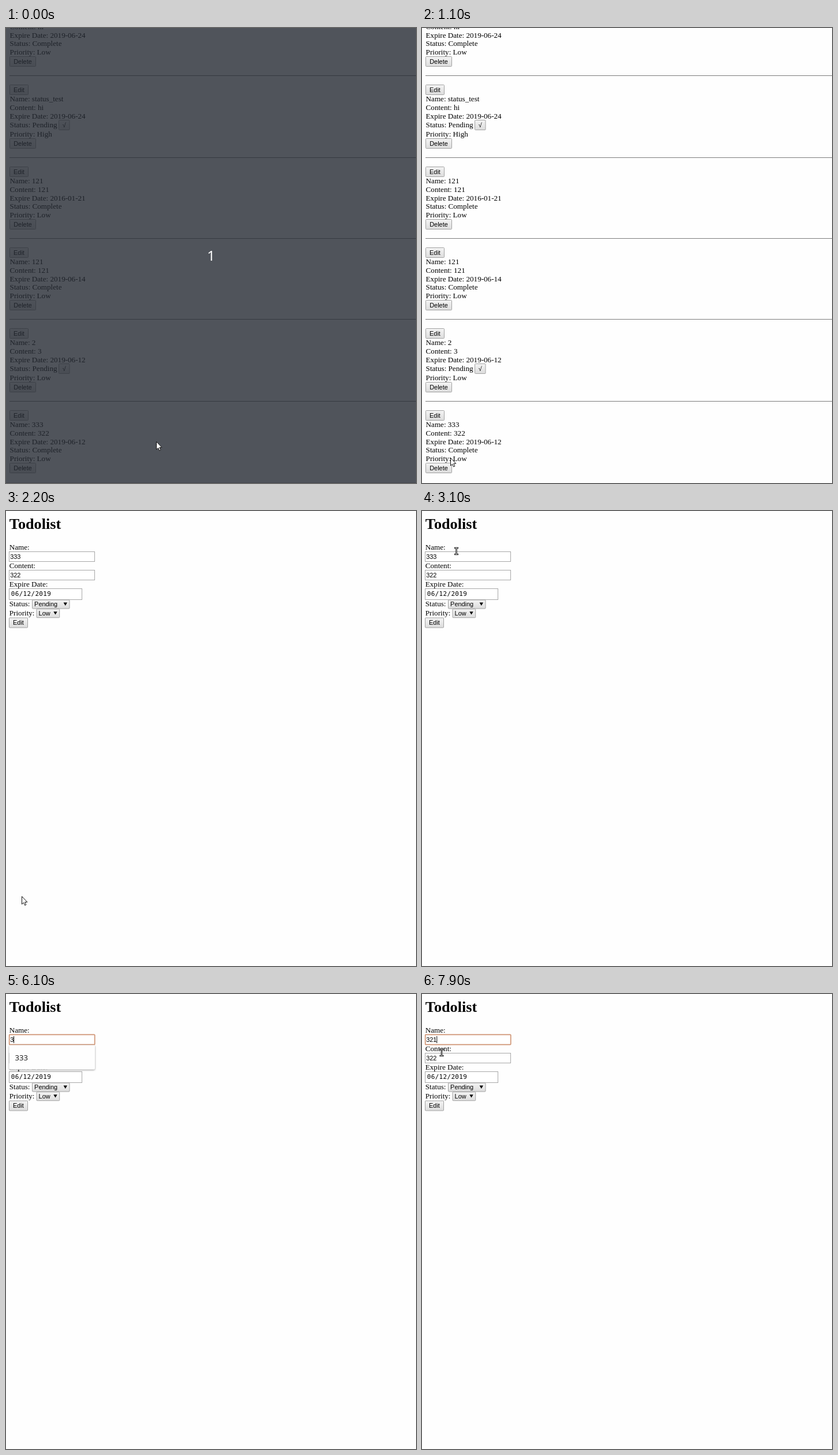
Animation, 710 px wide and 788 px high, one loop 8000 ms. Source, as an HTML page:

```html
<!DOCTYPE html>
<html lang="en">
<head>
<meta charset="utf-8">
<title>Todolist</title>
<style>
html, body { margin: 0; width: 100%; height: 100%; overflow: hidden; background: #fefefe; }
svg { display: block; width: 710px; height: 788px; }
text { font: 13.12px "Liberation Serif", serif; white-space: pre; }
.title { font-size: 26.24px; font-weight: bold; }
.ui { font: 10.93px "Liberation Sans", sans-serif; }
.mid { text-anchor: middle; }
.date { font: 10.93px "DejaVu Sans Mono", monospace; letter-spacing: .36px; }
.option { font: 500 13.1px "Noto Sans", sans-serif; fill: #222; }
.count { font: 24px "Noto Sans", sans-serif; fill: #fff; }
.btn { fill: url(#face); stroke: #a2a2a2; }
.hover .btn { fill: url(#lit); stroke: #6f6f6f; }
.box { fill: #fff; stroke: #a8a8a8; }
.rule { fill: #7c7c7c; }
#menu rect { fill: #fefefe; filter: drop-shadow(0 1px 1.5px rgba(0, 0, 0, .4)); }
</style>
</head>
<body>
<svg viewBox="0 0 710 788" xmlns="http://www.w3.org/2000/svg">
  <defs>
    <linearGradient id="face" x2="0" y2="1"><stop stop-color="#f4f4f4"/><stop offset="1" stop-color="#dcdcdc"/></linearGradient>
    <linearGradient id="lit" x2="0" y2="1"><stop stop-color="#f9f9f9"/><stop offset="1" stop-color="#e4e4e4"/></linearGradient>
  </defs>
  <rect width="710" height="788" fill="#fefefe"/>
  <g id="list"></g>
  <g id="form"></g>
  <g id="shade">
    <rect width="710" height="788" fill="rgb(37,42,50)" fill-opacity=".8"/>
    <rect y="787" width="710" height="1" fill="#45484e"/>
    <text class="count mid" x="355" y="403">1</text>
  </g>
  <path id="arrow" d="M.5 .5V14L3.6 11.2 5.6 15.9 7.8 15 5.8 10.3H9.8Z" fill="#fff" stroke="#111"/>
  <g id="beam" fill="none">
    <path d="M-3.5 -5.5H3.5M-3.5 5.5H3.5M0 -5.5V5.5" stroke="#111" stroke-width="2.6"/>
    <path d="M-2.6 -5.5H2.6M-2.6 5.5H2.6M0 -5.5V5.5" stroke="#eee" stroke-width=".8"/>
  </g>
</svg>
<script>
const $ = id => document.getElementById(id);
const text = (x, y, s, cls = '') => `<text class="${cls}" x="${x}" y="${y}">${s}</text>`;
const rect = (x, y, w, h, cls, r = 0) =>
  `<rect class="${cls}" x="${x}" y="${y}" width="${w}" height="${h}" rx="${r}"/>`;
const button = (x, cy, w, label, id = '') =>
  `<g id="${id}">${rect(x, cy - 8.5, w, 17, 'btn', 1)}${text(x + w / 2, cy + 3.9, label, 'ui mid')}</g>`;
const select = (x, y, w, label) => rect(x, y, w, 15, 'btn', 1) +
  text(x + 3.6, y + 11.4, label, 'ui') +
  `<path d="M${x + w - 10.4} ${y + 4.5}h6.4l-3.2 5.4z"/>`;

// top rule, name, content, date, priority, pending
const items = [
  [-58, 'test', 'hi', '2019-06-24', 'Low'],
  [82, 'status_test', 'hi', '2019-06-24', 'High', true],
  [224, '121', '121', '2016-01-21', 'Low'],
  [364, '121', '121', '2019-06-14', 'Low'],
  [504, '2', '3', '2019-06-12', 'Low', true],
  [646, '333', '322', '2019-06-12', 'Low']
];
$('list').innerHTML = items.map(([top, name, content, date, priority, pending], i) => {
  const last = i === items.length - 1;
  const grow = pending ? 1 : 0;
  const line = (n, s, dy = 0) => text(6.6, top + 45.2 + n * 14.72 + dy, s);
  return rect(6, top, 704, 1, 'rule') +
    button(6.5, top + 25, 32, 'Edit', last ? 'edit' : '') +
    line(0, 'Name: ' + name) +
    line(1, 'Content: ' + content) +
    line(2, 'Expire Date: ' + date) +
    line(3, 'Status: ' + (pending ? 'Pending' : 'Complete'), grow) +
    (pending ? button(91.5, top + 86, 18.5, '√') : '') +
    line(4, 'Priority: ' + priority, 2 * grow) +
    button(6.5, top + 116 + 2 * grow, 45, 'Delete', last ? 'delete' : '');
}).join('');

$('form').innerHTML =
  text(5.8, 31, 'Todolist', 'title') +
  text(5.8, 67, 'Name:') +
  rect(5.5, 70.5, 148, 17, 'box') +
  '<rect id="focus" x="5.7" y="70.4" width="148" height="17.2" rx="1" fill="none" stroke="#cf9474" stroke-width="1.7"/>' +
  '<rect id="mark" x="7" y="72.5" width="18.5" height="13" fill="#dc7a5a"/>' +
  '<text id="value" class="ui" x="7.2" y="82.9"></text>' +
  '<rect id="caret" y="73" width="1" height="12"/>' +
  text(5.8, 99, 'Content:') +
  rect(5.5, 102.5, 148, 17, 'box') + text(7.2, 114.9, '322', 'ui') +
  text(5.8, 131, 'Expire Date:') +
  rect(5.5, 134.5, 126, 19, 'box') + text(8.8, 147.4, '06/12/2019', 'date') +
  text(5.8, 165.2, 'Status:') + select(45.5, 154, 64.5, 'Pending') +
  text(5.8, 181, 'Priority:') + select(53, 169.7, 39.7, 'Low') +
  button(5.5, 193.5, 32, 'Edit') +
  `<g id="menu">${rect(5.5, 88.5, 148.5, 42.3, '', 2)}${text(15.5, 114.7, '333', 'option')}</g>`;

// time, x, y, shape
const pointer = [
  [0, 260, 716, 'arrow'], [300, 256, 716, 'arrow'], [400, 143, 740, 'arrow'],
  [600, 112, 744, 'arrow'], [700, 80, 751, 'arrow'], [800, 58, 755, 'arrow'], [900, 50, 756, 'arrow'],
  [1100, 49, 744, 'arrow'], [1200, 44, 718, 'arrow'], [1300, 36, 695, 'arrow'],
  [1400, 30, 682, 'arrow'], [1500, 28, 679, 'arrow'], [1700, 26, 671, 'arrow'], [1800, 25, 667, 'arrow'],
  [2200, 27, 667, 'arrow'], [2400, 285, 595, 'arrow'], [2600, 218, 400, 'arrow'],
  [2700, 142, 230, 'arrow'], [2800, 96, 146, 'arrow'], [2900, 79.5, 121, 'beam'],
  [3100, 59.5, 69.5, 'beam'], [3200, 58.8, 68.3, 'beam'], [3300, 58.3, 67.5, 'beam'],
  [3500, 58.3, 79.5, 'beam'], [4000, 0, 0, ''],
  [7700, 2, 91, 'arrow'], [7800, 20, 98, 'beam'], [7900, 34, 101.5, 'beam']
];
const values = [[0, '333'], [6100, '3'], [6300, '32'], [6600, '321']];
const menuFade = [[0, 0], [3800, .6], [3900, 1], [6400, .5], [6500, 0]];
const carets = [[0, 0], [3700, 1], [4000, 0], [6100, 1], [7200, 0], [7700, 1]];

const at = (steps, t) => steps.filter(s => s[0] <= t).pop();
const show = (id, on) => $(id).style.display = on ? '' : 'none';

function draw(t) {
  const [, x, y, shape] = at(pointer, t);
  const value = at(values, t)[1];
  const fade = at(menuFade, t)[1];
  const marked = t >= 4000 && t < 6100;

  show('shade', t < 300);
  show('list', t < 2200);
  show('form', t >= 2200);
  for (const id of ['arrow', 'beam']) {
    show(id, id === shape);
    $(id).setAttribute('transform', `translate(${x} ${y})`);
  }
  $('edit').classList.toggle('hover', x < 38 && y > 662 && y < 680);
  $('delete').classList.toggle('hover', x < 52 && y > 753);

  show('focus', t >= 3700);
  show('mark', marked);
  show('caret', at(carets, t)[1]);
  show('menu', fade);
  $('menu').style.opacity = fade;
  $('value').textContent = value;
  $('value').style.fill = marked ? '#f5ddd2' : '#000';
  $('caret').setAttribute('x', 7 + value.length * 6.08);
}

const start = performance.now();
function tick() {
  draw((performance.now() - start) % 8000);
  requestAnimationFrame(tick);
}
tick();
</script>
</body>
</html>
```
